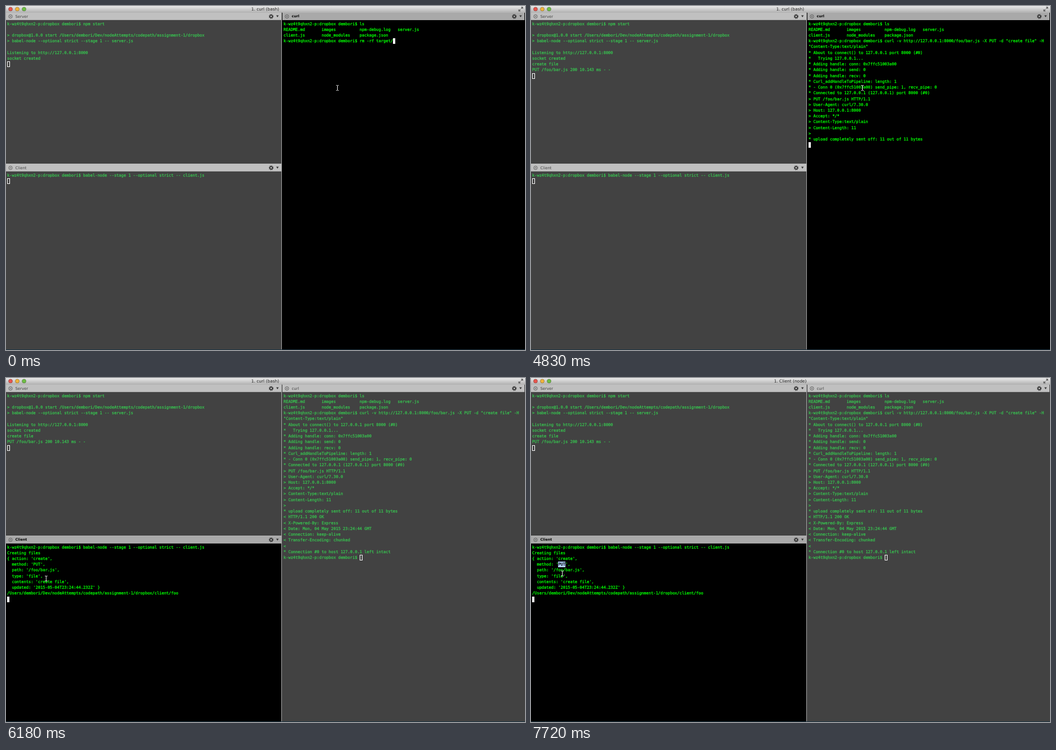
Recreate the animation shown at these times as an HTML page. Size 920x609 px, loop 8 s.

```html
<!DOCTYPE html>
<html lang="en">
<head>
<meta charset="utf-8">
<title>Terminal session</title>
<style>
html, body { margin: 0; width: 100%; height: 100%; overflow: hidden; background: #424242; }
#stage { position: relative; width: 920px; height: 609px; overflow: hidden; text-rendering: geometricPrecision; }
#stage div, section, header, pre, svg, i, b { position: absolute; box-sizing: border-box; }
#bar { left: 0; top: 0; width: 920px; height: 12px; background: linear-gradient(#e9e9e9, #b4b4b4); border-bottom: 1px solid #a0a0a0; }
#title { left: 0; width: 919px; top: 0; text-align: center; font: 7.45px/12px "DejaVu Sans", sans-serif; color: #222; }
#split { left: 488px; top: 12px; width: 1px; height: 596px; background: #a8a8a8; z-index: 1; }
section { background: #424242; color: #38c250; box-shadow: -1px 0 #424242, 1px 0 #424242; }
section.on { background: #000; color: #0f0; box-shadow: -1px 0 #000, 1px 0 #000; }
header { left: 0; top: 0; width: 100%; height: 13px; background: #c0c0c0; border-bottom: 1px solid #aaa; box-shadow: 0 -1px #b4b4b4; color: #444; font: 6.9px/14px "DejaVu Sans", sans-serif; }
.on header { background: #a9a9a9; color: #000; font-weight: bold; font-size: 6.3px; }
header span { position: absolute; left: 16.5px; }
pre { left: 2px; top: 14.5px; margin: 0; }
pre, #pick { font: 7px/10.24px "DejaVu Sans Mono", monospace; -webkit-text-stroke: .28px; }
pre i { width: 5px; height: 10px; border: 1px solid #fff; }
.on pre i { width: 4.3px; background: #fff; }
#pick { left: 48.4px; top: 325px; width: 12.7px; height: 10.2px; background: #b5d5ff; color: #000; }
svg { overflow: visible; left: 0; top: 0; width: 1px; height: 1px; }
</style>
</head>
<body>
<div id="stage">
  <div id="bar"></div>
  <svg id="lights"></svg>
  <div id="title"></div>
  <div id="split"></div>
  <div style="left:0;top:608px;width:920px;height:1px;background:#1c3342"></div>
  <b id="pick">PUT</b>
  <svg id="mouse"><path d="M.3 .5H1.7L2.5 1.2 3.3 .5H4.7M2.5 1V9M.3 9.5H1.7L2.5 8.8 3.3 9.5H4.7" fill="none" stroke="#fff" stroke-width=".95"/></svg>
</div>
<script>
const $ = id => document.getElementById(id);
const stage = $('stage'), user = 'dembori';
const prompt = `k-wz4t9qhxn2-p:dropbox ${user}$ `;
const root = `/Users/${user}/Dev/nodeAttempts/codepath/assignment-1/dropbox`;

const serverText = `${prompt}npm start

> dropbox@1.0.0 start ${root}
> babel-node --optional strict --stage 1 -- server.js

Listening to http://127.0.0.1:8000
socket created
`;
const serverLog = `create file
PUT /foo/bar.js 200 10.143 ms - -
`;
const clientText = `${prompt}babel-node --stage 1 --optional strict -- client.js
`;
const clientLog = `Creating files
{ action: 'create',
  method: 'PUT',
  path: '/foo/bar.js',
  type: 'file',
  contents: 'create file',
  updated: '2015-05-04T23:24:44.232Z' }
${root}/client/foo
`;
const listing = `${prompt}ls
README.md       images          npm-debug.log   server.js
client.js       node_modules    package.json
${prompt}`;
const command = `curl -v http://127.0.0.1:8000/foo/bar.js -X PUT -d "create file" -H
"Content-Type:text/plain"`;
const request = `
* About to connect() to 127.0.0.1 port 8000 (#0)
*   Trying 127.0.0.1...
* Adding handle: conn: 0x7ffc51003a00
* Adding handle: send: 0
* Adding handle: recv: 0
* Curl_addHandleToPipeline: length: 1
* - Conn 0 (0x7ffc51003a00) send_pipe: 1, recv_pipe: 0
* Connected to 127.0.0.1 (127.0.0.1) port 8000 (#0)
> PUT /foo/bar.js HTTP/1.1
> User-Agent: curl/7.30.0
> Host: 127.0.0.1:8000
> Accept: */*
> Content-Type:text/plain
> Content-Length: 11
>
* upload completely sent off: 11 out of 11 bytes
`;
const response = `< HTTP/1.1 200 OK
< X-Powered-By: Express
< Date: Mon, 04 May 2015 23:24:44 GMT
< Connection: keep-alive
< Transfer-Encoding: chunked
<
* Connection #0 to host 127.0.0.1 left intact
${prompt}`;

// Each step: start time, then value(s)
const typed = [[0, 'rm -rf target/'], [150, 'ls'], [480, 'ls client/'], [780, 'ls'], [1230, command]];
const pointer = [
  [0, 587.5, 145], [5280, 587.5, 149], [5430, 252.5, 360], [5580, 196.5, 398],
  [5730, 100.5, 388], [5880, 69.8, 355], [6030, 71.2, 355], [6330, 54.5, 357],
  [6540, 43.5, 337], [6690, 51.3, 334], [6840, 57.5, 330], [6990, 57, 330],
  [7430, 57.5, 342], [7580, 59.5, 352], [7720, 55.5, 346]
];
const at = (steps, t) => steps.findLast(s => s[0] <= t);

function makePane(name, x, y, w, h) {
  const el = document.createElement('section');
  el.style.cssText = `left:${x}px;top:${y}px;width:${w}px;height:${h}px`;
  el.innerHTML = `<header><svg fill="none" stroke="#555" stroke-width=".8">
    <circle cx="8" cy="6.5" r="3.2"/><path d="M6.7 5.2l2.6 2.6m0-2.6l-2.6 2.6"/>
    <g transform="translate(${w - 18} 6.5)" stroke="#333"><circle r="2.3" stroke-width="1.7"/>
    <circle r="3.6" stroke-width="1.2" stroke-dasharray="1.41"/></g>
    <path d="M${w - 9} 4.5h4.4l-2.2 3.6z" fill="#333" stroke="none"/>
    </svg><span>${name}</span></header><pre><span></span><i></i></pre>`;
  stage.insertBefore(el, $('pick'));
  const out = el.querySelector('pre span');
  return (text, on) => {
    if (out.textContent !== text) out.textContent = text;
    el.classList.toggle('on', on);
  };
}
const server = makePane('Server', 0, 12, 488, 268);
const client = makePane('Client', 0, 280, 488, 328);
const shell = makePane('curl', 490, 12, 429, 596);

$('lights').innerHTML = ['#e8574f', '#f0b43c', '#6fbf45'].map((c, k) =>
  `<circle cx="${8 + 12 * k}" cy="5.5" r="3.5" fill="${c}" stroke="#0006" stroke-width=".7"/>`).join('') +
  '<path d="M909 9l2.8-2.8M913 4.8l2.8-2.8M909 6v3h3M913 2h3v3" fill="none" stroke="#555" stroke-width="1.1"/>';

function draw() {
  const t = performance.now() % 8000;
  const sent = t >= 4830, done = t >= 4980, switched = t >= 6180;
  server(serverText + (sent ? serverLog : ''), false);
  client(clientText + (done ? clientLog : ''), switched);
  shell(listing + at(typed, t)[1] + (sent ? request : '') + (done ? response : ''), !switched);
  $('title').textContent = t < 6330 ? '1. curl (bash)' : '1. Client (node)';
  $('pick').style.display = t < 7280 ? 'none' : 'block';
  const [, x, y] = at(pointer, t);
  $('mouse').style.transform = `translate(${x - 2.5}px, ${y - 5}px)`;
  requestAnimationFrame(draw);
}
draw();
</script>
</body>
</html>
```
